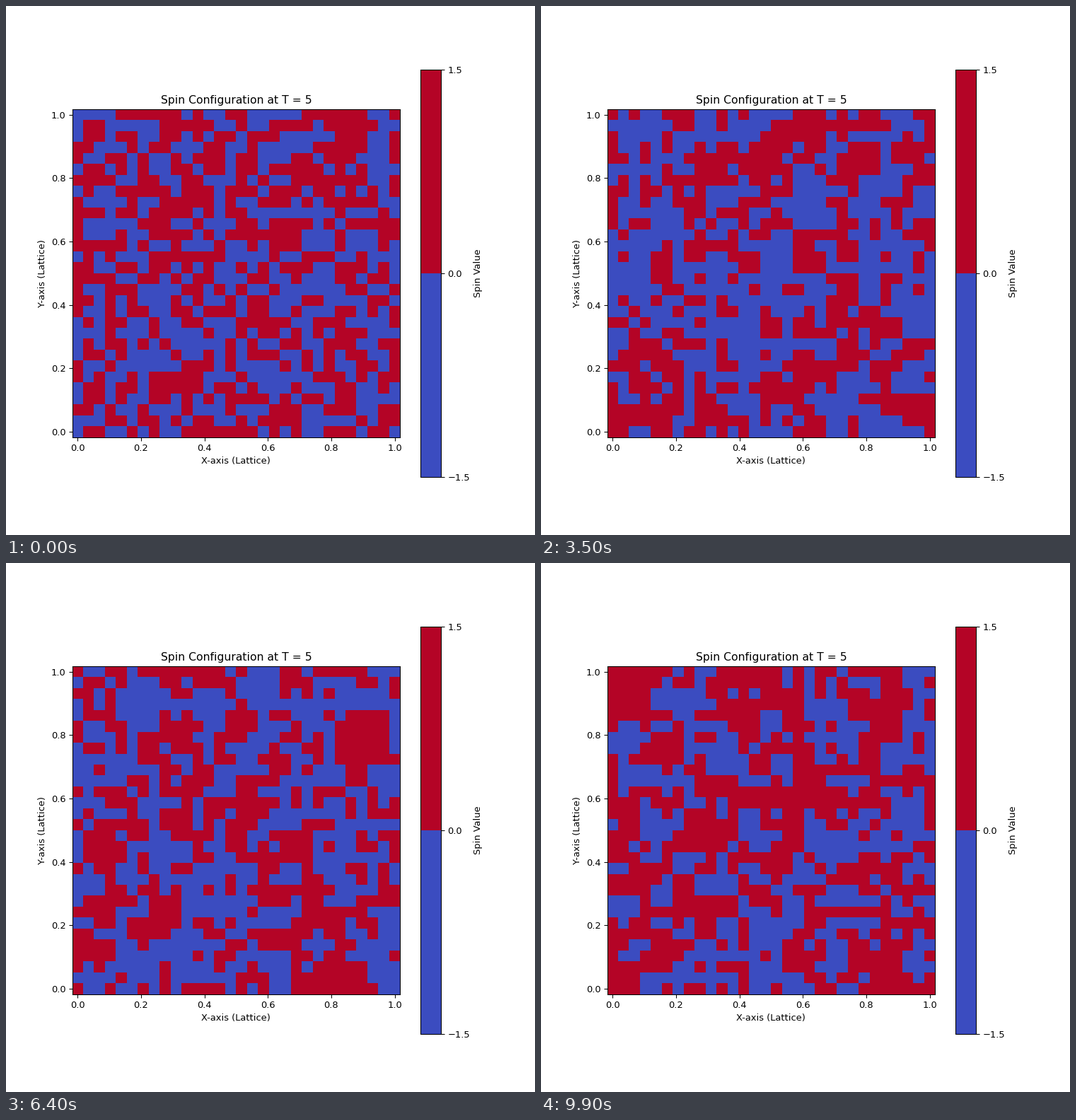
Recreate the animation shown at these times as a matplotlib script. Size 748 by 748 pixels, loop 10000 ms.

```python
import numpy as np
import matplotlib.pyplot as plt
from matplotlib.animation import FuncAnimation
from matplotlib.colors import BoundaryNorm

N = 30
TEMP = 5
FRAMES = 100
INTERVAL = 100


def sweep(spins, rng):
    """One Metropolis sweep: N * N single-spin trials with periodic edges."""
    sites = rng.integers(0, N, (N * N, 2)).tolist()
    draws = rng.random(N * N).tolist()
    accept = {d: np.exp(-d / TEMP) for d in (-8, -4, 0, 4, 8)}
    for (i, j), r in zip(sites, draws):
        around = (spins[i - 1][j] + spins[(i + 1) % N][j]
                  + spins[i][j - 1] + spins[i][(j + 1) % N])
        if r < accept[2 * spins[i][j] * around]:
            spins[i][j] *= -1


def simulate(seed=42):
    rng = np.random.default_rng(seed)
    spins = rng.choice([-1, 1], (N, N)).tolist()
    states = [np.array(spins)]
    for _ in range(FRAMES - 1):
        sweep(spins, rng)
        states.append(np.array(spins))
    return states


states = simulate()

plt.rcParams["font.family"] = "DejaVu Sans"
fig, ax = plt.subplots(figsize=(8, 8), dpi=93.5)
axis = np.linspace(0, 1, N)
norm = BoundaryNorm([-1.5, 0, 1.5], 256)
mesh = ax.pcolormesh(axis, axis, states[0], cmap="coolwarm", norm=norm,
                     shading="nearest")
fig.colorbar(mesh, ax=ax, label="Spin Value")
ax.set_aspect("equal")
ax.set_title(f"Spin Configuration at T = {TEMP}")
ax.set_xlabel("X-axis (Lattice)")
ax.set_ylabel("Y-axis (Lattice)")


def update(frame):
    mesh.set_array(states[frame])
    return (mesh,)


anim = FuncAnimation(fig, update, frames=FRAMES, interval=INTERVAL,
                     repeat=True, repeat_delay=0)
plt.show()
```
